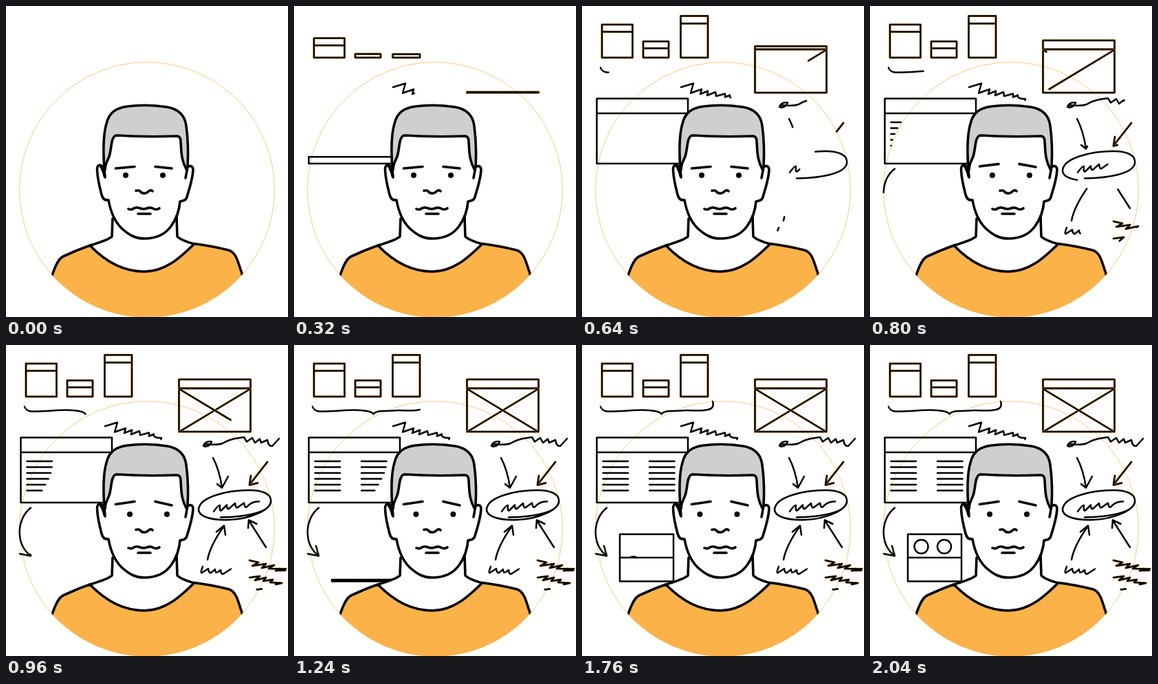
An HTML page for the animation above (3.68 s loop, 410 by 452 pixels).

```html
<!DOCTYPE html>
<html lang="en">
<head>
<meta charset="utf-8">
<title>Man with sketches</title>
<style>
  html, body { margin: 0; width: 100%; height: 100%; overflow: hidden; background: #fff; }
  svg { display: block; width: 100%; height: 100%; }
  path, circle { stroke-linecap: round; stroke-linejoin: round; }
  .ink { fill: none; stroke: #000; stroke-width: 2.5; }
  .glow { fill: none; stroke: #fbb230; stroke-width: 3.6; opacity: .7; }
  .skin { fill: #fff; stroke: #000; stroke-width: 3.6; }
  .line { fill: none; stroke: #000; stroke-width: 3.6; }
</style>
</head>
<body>
<svg viewBox="0 0 410 452">
  <clipPath id="disc"><circle cx="205" cy="267" r="185.5"/></clipPath>
  <clipPath id="upper"><path d="M40 260H150V309H40Z"/></clipPath>
  <circle cx="205" cy="267" r="185.4" fill="none" stroke="#fbb248" stroke-width=".7" shape-rendering="crispEdges"/>
  <g id="sketch"></g>
  <g id="eyesInBox" class="ink" clip-path="url(#upper)">
    <circle cx="74.5" r="10"/>
    <circle cx="108" r="10"/>
  </g>
  <g clip-path="url(#disc)">
    <path fill="#fff" d="M155 305L154 335Q150 340 122 348Q160 386 201 386Q238 380 274 346Q250 339 249 335L248 305Z"/>
    <path class="line" d="M155 309L154 335Q149 340 122 348M248 306L249 335Q255 341 274 346"/>
    <path class="skin" style="fill:#fbb248" d="M60 412C68 388 74 368 83 364Q102 355 122 348C148 375 174 386 201 386C231 386 252 367 274 345.500Q301 349 324 355C335 358 337 370 350 412L350 470H60Z"/>
  </g>
  <path class="skin" d="M144 238C140 230 132 228 132.500 238C133 250 136 263 139 274Q141 283 149 282C152 299 158 313 168 323C179 333 188 338 201 338C216 338 230 334 240 320C248 309 252 297 253 284Q261 283 262.500 279C266 268 271 253 272 239C272 231 267 232 263 234L258 180H150Z"/>
  <path fill="#cfcfcf" d="M144 249C141 217 141 188 146 171C150 154 161 148 176 146Q205 142 235 147C251 150 260 159 262 174Q265 202 264 234L262 237C255 224 255 214 254 197Q254 189 248 189Q205 191 161 188Q157 188 155 194C152 202 153 213 149 221Q145 229 143 238Z"/>
  <path class="line" d="M144 249C141 217 141 188 146 171C150 154 161 148 176 146Q205 142 235 147C251 150 260 159 262 174C265 196 265 217 264 234L261 250"/>
  <path class="line" d="M143 238Q145 229 149 221C153 213 152 202 155 194Q157 188 161 188Q205 191 248 189Q254 189 254 197C255 214 255 224 262 237M137 232Q142 240 143 247"/>
  <path class="line" d="M189 268.500C194 267 195 269 196 270.500C199 273 204 273 206.500 270C208 268 211 267 213 269"/>
  <path class="line" d="M178 295Q182 297 186 294Q190 292 195 294Q200 296 205 294Q210 292 214 294.500Q219 297 223 294M192 302H210"/>
  <path id="brows" class="line"/>
  <g id="pupils"><circle cx="174" cy="246" r="4"/><circle cx="228" cy="246" r="4"/></g>
</svg>
<script>
const LOOP = 3680, STEP = 40;
const $ = id => document.getElementById(id);
const sketch = $('sketch'), rings = $('eyesInBox').children;
const parts = [];

const clamp = u => Math.max(0, Math.min(1, u));
const span = (t, start, dur) => clamp((t - start) / dur);
const linear = u => u;
const ease = u => u * u * (3 - 2 * u);
const eased = (t, start, dur) => ease(span(t, start, dur));
const mix = (a, b, p) => a + (b - a) * p;

function addPath(cls) {
  const el = document.createElementNS('http://www.w3.org/2000/svg', 'path');
  el.setAttribute('class', cls);
  sketch.append(el);
  return el;
}

const inkPaths = glow => (glow ? ['glow', 'ink'] : ['ink']).map(addPath);

// A pen line that is drawn from its first point to its last.
function pen(d, start, dur, { curve = linear, glow = false } = {}) {
  const els = inkPaths(glow);
  for (const el of els) {
    el.setAttribute('d', d);
    el.setAttribute('pathLength', 1);
    el.setAttribute('stroke-dasharray', '1 2');
  }
  parts.push(t => {
    const p = curve(span(t, start, dur));
    for (const el of els) {
      el.style.display = p > 0 ? '' : 'none';
      el.setAttribute('stroke-dashoffset', 1 - p);
    }
  });
}

function arrow(shaft, head, start, dur, style) {
  pen(shaft, start, dur, style);
  pen(head, start + dur, dur * .5, style);
}

// A box that rises from its bottom edge; its title bar keeps its height.
function box({ x, r, top, bottom, bar = 0, start, dur, glow = false, extra = 0 }) {
  const els = inkPaths(glow);
  parts.push(t => {
    const p = eased(t, start, dur);
    const y = mix(bottom, top, p), right = r + extra * (1 - p);
    let d = `M${x} ${bottom}V${y}H${right}V${bottom}Z`;
    if (bar && y + bar < bottom) d += `M${x} ${y + bar}H${r}`;
    if (extra) d += `M${r} ${y}V${bottom}`;
    for (const el of els) el.setAttribute('d', p > 0 ? d : '');
  });
}

const glow = { glow: true };

// Windows
box({ x: 29, r: 73.5, top: 27, bottom: 75, bar: 10.5, start: 40, dur: 500, glow: true });
box({ x: 89, r: 126, top: 51.5, bottom: 75, bar: 10, start: 196, dur: 400, glow: true });
box({ x: 143.5, r: 183, top: 14.5, bottom: 75, bar: 11, start: 250, dur: 395, glow: true });
box({ x: 21.5, r: 154, top: 134.5, bottom: 229, bar: 21.5, start: 240, dur: 400 });
box({ x: 251.5, r: 355.5, top: 63, bottom: 126, start: 298, dur: 290, glow: true });
box({ x: 251.5, r: 355.5, top: 50, bottom: 63, start: 560, dur: 200, glow: true });
box({ x: 55, r: 133, top: 275, bottom: 343.5, bar: 34, start: 1195, dur: 400, extra: 64 });
pen('M355 64L252 126', 580, 240, glow);
pen('M252 64L355 126', 790, 235, glow);

// Text rows
for (let i = 0; i < 6; i++) {
  const y = 169 + i * 8.5;
  pen(`M30.500 ${y}H67`, 688 + i * 25, 260, { curve: ease });
  pen(`M98 ${y}H134.500`, 980 + i * 25, 260, { curve: ease });
}

// Scribbles
pen('M144 118L162 112.500 158 126.500 174 121 172 128 183 123.500 182 130 194 125 195 131 208 127.500 208 132.500 215 129.500Q213 135 226 135L225.500 137', 20, 680);
pen('M27 89.500Q29 96 37 96.500C60 97 80 93 98 95Q113 96 115.500 100.500C119 95 130 96 142 95.500C156 94 172 97 183 94Q193 92 190 82', 582, 725);
pen('M287 146.500Q290 139 299 140.500Q296 148 289 147.500Q286 145 292 144Q306 146 315 143Q324 137 339 135L346 134 350 140.500 358 135 362 142 369 136.500 371 142 380 138Q381 147 387 147L397 136', 440, 480);
pen('M302 242Q309 232 311 233Q310 242 313 240.500L321 232.500Q321 239 324 238L333 230Q334 238 337 236L346 229.500Q347 237 350 235.500Q357 227 368 227.500', 545, 360);
pen('M286 322Q282 332 285 331L294 325Q295 332 298 331L304 326Q304 332 308 330L312 327Q313 335 317 332L327 325.500', 620, 300);
pen('M354 313L367 316 358 321 378 318 372 324 390 320 382 325 407 325.500 392 328 406 327.500', 680, 220, glow);
pen('M354 338L369 336 362 342 378 338 374 343 388 341 384 345 401 346 392 348', 760, 160, glow);
pen('M364.500 355.500L372 354.500', 900, 50);

// Oval with its tail, and the arrows around it
pen('M312 250.500C345 250 388 244 385 225C384 215 370 211 354 211C321 211 281 221 280 239C280 250 300 255 325 254C354 253 386 240 385 226', 416, 540);
arrow('M301 164Q310 181 314 207', 'M307 202L314 207.500 323 191', 590, 170);
arrow('M380 170L354 203', 'M356 190L354 203.500 366 200.500', 580, 160, glow);
arrow('M293 312Q297 291 317 263', 'M306 271.500L317 262.500 319 276', 620, 190);
arrow('M378 294L353 255', 'M352 266L353 254.500 364.500 260', 680, 170);

// Side arrow
pen('M36 236.500C14 254 15 291 35 305.500', 700, 200);
pen('M20 303.500L36 306.500 32 292', 890, 120);

function render(t) {
  for (const part of parts) part(t);

  [[1700, 300], [1760, 280]].forEach(([start, dur], i) => {
    rings[i].setAttribute('cy', mix(320.3, 293, eased(t, start, dur)));
  });

  const look = 6 * eased(t, 680, 200) - 10 * eased(t, 1160, 240) + 4 * eased(t, 1680, 200);
  $('pupils').setAttribute('transform', `translate(${look} 0)`);

  const worry = eased(t, 680, 200);
  const y = (a, b) => mix(a, b, worry);
  $('brows').setAttribute('d',
    `M159.500 ${y(236, 231.5)}L187 ${y(233.5, 227.5)}M217 ${y(233.5, 227.5)}L241 ${y(236, 233)}`);
}

function tick() {
  const t = performance.now() % LOOP;
  render(Math.floor(t / STEP) * STEP);
  requestAnimationFrame(tick);
}
tick();
</script>
</body>
</html>
```
